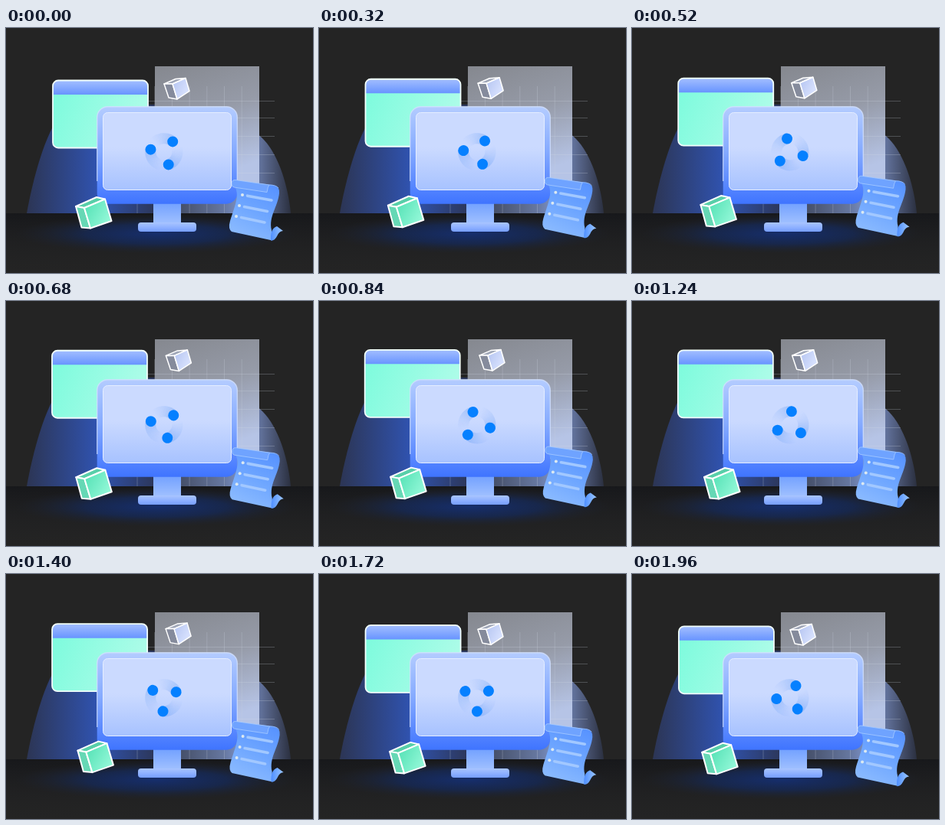
Recreate the animation shown at these times as an HTML page. Size 400x320 px, loop 2 s.

```html
<!DOCTYPE html>
<html lang="en">
<head>
<meta charset="utf-8">
<title>Floating desktop</title>
<style>
html, body { margin: 0; width: 100%; height: 100%; overflow: hidden; background: #242424; }
svg { display: block; width: 400px; height: 320px; }
#spinner i { display: none; }
</style>
</head>
<body>
<svg viewBox="0 0 400 320">
  <defs>
    <linearGradient id="domeL"><stop stop-color="#2c3554"/><stop offset=".55" stop-color="#3053b0"/><stop offset="1" stop-color="#2c3658"/></linearGradient>
    <linearGradient id="domeR"><stop stop-color="#343a4c"/><stop offset=".5" stop-color="#66779f"/><stop offset=".65" stop-color="#7f95cc"/><stop offset="1" stop-color="#2b3040"/></linearGradient>
    <radialGradient id="floor"><stop stop-color="#162e6c"/><stop offset=".5" stop-color="#172850" stop-opacity=".9"/><stop offset="1" stop-color="#20232c" stop-opacity="0"/></radialGradient>
    <linearGradient id="shade" x2="0" y2="1"><stop stop-color="#17181b"/><stop offset="1" stop-color="#202123" stop-opacity="0"/></linearGradient>
    <linearGradient id="panel" x2=".3" y2="1"><stop stop-color="#85888f"/><stop offset=".5" stop-color="#969ba8"/><stop offset="1" stop-color="#b6c4e6"/></linearGradient>
    <linearGradient id="case" x2="0" y2="1"><stop stop-color="#b4ccff"/><stop offset=".45" stop-color="#86abff"/><stop offset="1" stop-color="#3f74ff"/></linearGradient>
    <linearGradient id="screen" x2="0" y2="1"><stop stop-color="#cbdaff"/><stop offset=".45" stop-color="#cbdaff"/><stop offset="1" stop-color="#a7c2ff"/></linearGradient>
    <linearGradient id="neck" x2="0" y2="1"><stop stop-color="#71a0ff"/><stop offset="1" stop-color="#a0c0ff"/></linearGradient>
    <linearGradient id="foot" x2="0" y2="1"><stop stop-color="#a9c5ff"/><stop offset="1" stop-color="#769eff"/></linearGradient>
    <linearGradient id="bar" x2="0" y2="1"><stop stop-color="#a8c2ff"/><stop offset="1" stop-color="#6894ff"/></linearGradient>
    <linearGradient id="mint" y2=".3"><stop stop-color="#7afbdc"/><stop offset="1" stop-color="#acfce8"/></linearGradient>
    <linearGradient id="green" x2="1" y2=".6"><stop stop-color="#4fdfb2"/><stop offset="1" stop-color="#93f8d8"/></linearGradient>
    <linearGradient id="ice" x2="1" y2=".6"><stop stop-color="#b3c3f0"/><stop offset="1" stop-color="#dbe4ff"/></linearGradient>
    <linearGradient id="sheet" x1=".7" x2=".3" y2="1"><stop stop-color="#5792ff"/><stop offset=".5" stop-color="#6ea6ff"/><stop offset="1" stop-color="#8dbcff"/></linearGradient>
    <linearGradient id="curl"><stop stop-color="#4f8fff"/><stop offset="1" stop-color="#9cc8ff"/></linearGradient>
    <clipPath id="frame"><rect x="61" y="68.5" width="124" height="88" rx="7"/></clipPath>
  </defs>

  <rect width="400" height="320" fill="#242424"/>
  <rect y="242" width="400" height="78" fill="url(#shade)"/>
  <ellipse cx="196" cy="269" rx="184" ry="26" fill="url(#floor)"/>
  <path d="M27 242C34 203 46 158 60 131Q80 100 120 100H196V242Z" fill="url(#domeL)"/>
  <path d="M196 242V132H310C343 134 366 190 371 242Z" fill="url(#domeR)"/>
  <rect x="194" y="50" width="136" height="156" fill="url(#panel)"/>
  <path id="grid" fill="none" stroke="#d0d6e4" stroke-opacity=".25"/>

  <g id="window">
    <g clip-path="url(#frame)">
      <path d="M60 67h126v90h-126z" fill="url(#mint)"/>
      <path d="M60 67h126v20h-126z" fill="url(#bar)"/>
    </g>
    <rect x="61" y="68.5" width="124" height="88" rx="7" fill="none" stroke="#f2fffc" stroke-width="1.8"/>
  </g>

  <g id="smallCube" stroke="#fff" stroke-width="1.5" stroke-linejoin="round">
    <path d="M206 73L221 66.5L234 65.5L217 73Z" fill="#a0a7b8"/>
    <path d="M206 73L217 73L223 93L212 91Z" fill="#858b9c"/>
    <path d="M217 73L234 65.5L239 82.5L223 93Z" fill="url(#ice)"/>
  </g>

  <rect x="192" y="228" width="36" height="27" fill="url(#neck)"/>
  <rect x="172" y="254" width="76" height="12" rx="4" fill="url(#foot)"/>
  <rect x="118.7" y="102.7" width="182.6" height="127" rx="14" fill="url(#case)"/>
  <path d="M118.7 200V116.7a14 14 0 0 1 14-14h154.6a14 14 0 0 1 14 14V200" fill="none" stroke="#d4e2ff" stroke-opacity=".75" stroke-width="1.4"/>
  <rect x="126.5" y="110.5" width="167" height="101" rx="6" fill="url(#screen)" stroke="#e5edff"/>

  <g id="spinner"></g>

  <g id="greenCube" stroke="#fff" stroke-width="2" stroke-linejoin="round">
    <path d="M91 233L118 221L129 223.5L102 235Z" fill="#58cfa9"/>
    <path d="M91 233L102 235L110 261.5L98.5 260.5Z" fill="#66d8b5"/>
    <path d="M102 235L129 223.5L137.5 252L110 261.5Z" fill="url(#green)"/>
  </g>

  <g id="paper">
    <path d="M297 199L348 205Q357 207 356 216C354 234 342 246 346 264L347 277.5L294 266Q289 262 292 252C298 233 304 220 299 209Z" fill="url(#sheet)"/>
    <path d="M345 277.5Q344 262 353 259L361 265Q356 265 353 272Q350 278 345 277.5Z" fill="url(#curl)"/>
    <path d="M294 204Q294 198 299 198.5L343 205Q341 207 340 214.5L297 208Q294 207 294 204Z" fill="#6fa3ff" stroke="#a9ccff" stroke-width=".8"/>
    <path d="M343 205Q352 205 355 209" fill="none" stroke="#9cc2ff" stroke-width=".8"/>
    <path d="M314.5 219.2L346 225M310.5 233.5L340.5 239.5M306.5 247.5L337 254" stroke="#a2c8ff" stroke-width="3.6" stroke-linecap="round"/>
    <g fill="#dce9f0"><circle cx="308" cy="218" r="2"/><circle cx="304" cy="232" r="2"/><circle cx="300" cy="246" r="2"/></g>
  </g>
</svg>
<script>
const LOOP = 2000, ORBIT = 17.6, STEPS = 30;
const $ = id => document.getElementById(id);
const move = (id, x, y) => $(id).setAttribute("transform", `translate(${x} ${y})`);
const polar = (r, deg) => [r * Math.cos(deg * Math.PI / 180), r * Math.sin(deg * Math.PI / 180)];

let grid = "";
for (let i = 0; i < 7; i++) grid += `M${171 + i * 22.7} 76V242`;
for (const y of [95, 117, 141, 165, 189]) grid += `M171 ${y}.5H350`;
$("grid").setAttribute("d", grid);

// Each dot drags a fading arc behind it.
let parts = "";
for (let dot = 0; dot < 3; dot++) {
  const head = dot * 120 - 50;
  for (let i = 0; i < STEPS; i++) {
    const a = head - i * 3, alpha = .3 * (1 - i / STEPS) ** 1.4;
    parts += `<path d="M${polar(ORBIT, a - 3)}A${ORBIT} ${ORBIT} 0 0 1 ${polar(ORBIT, a)}" fill="none" stroke="#3b86ee" stroke-width="14" stroke-opacity="${alpha}"/>`;
  }
}
for (let dot = 0; dot < 3; dot++) {
  const [x, y] = polar(ORBIT, dot * 120 - 50);
  parts += `<circle cx="${x}" cy="${y}" r="7" fill="#0580ff"/>`;
}
$("spinner").innerHTML = parts;

// Sideways sway of the green cube: left, then right, then home.
function sway(t) {
  if (t < 500) return -1.8 * t / 500;
  if (t < 1000) return -1.8 + 5.8 * (t - 500) / 500;
  return 4 * (2 - t / 1000);
}

function draw(now) {
  const t = now % LOOP;
  const lift = 1 - Math.abs(t / 1000 - 1);
  move("window", -1.5 * lift, -5.5 * lift);
  move("smallCube", 3.5 * lift, -2.3 * lift);
  move("greenCube", sway(t), -4 * lift);
  move("paper", lift, -10 * lift);
  $("spinner").setAttribute("transform", `translate(205.8 161.8) rotate(${t * .36})`);
  requestAnimationFrame(draw);
}
draw(0);
</script>
</body>
</html>
```
